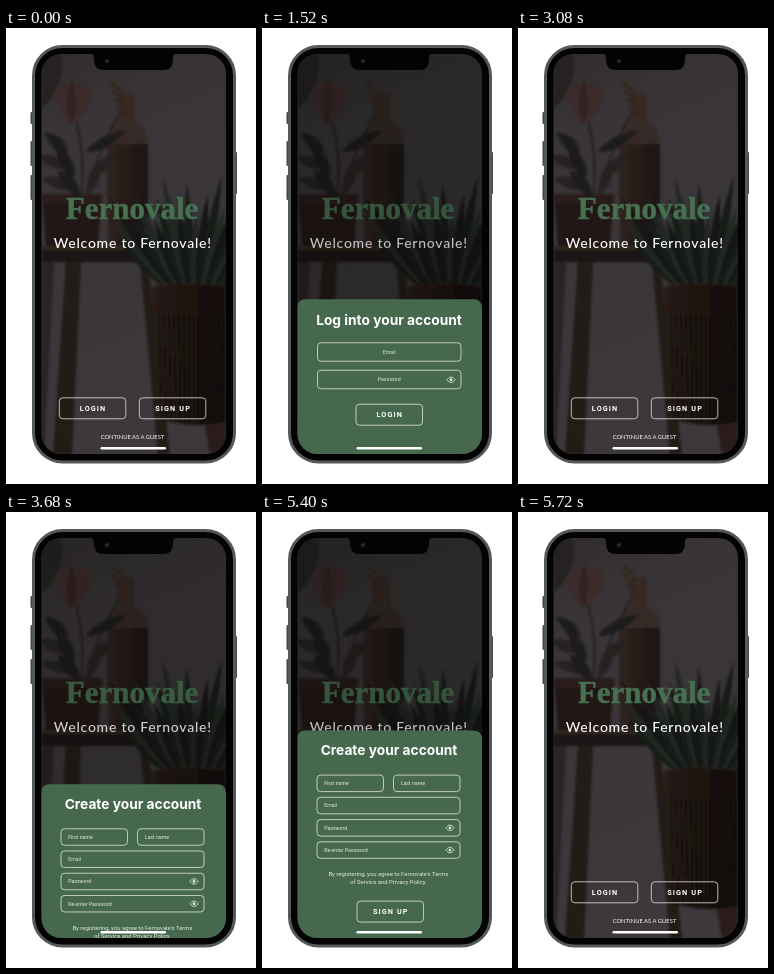
Animation, 250 px wide and 456 px high, one loop 5.76 s. Source, as an HTML page:

```html
<!DOCTYPE html>
<html lang="en">
<head>
<meta charset="utf-8">
<title>Plant shop sign-in</title>
<style>
html, body { margin: 0; width: 100%; height: 100%; overflow: hidden; background: #fff; }
svg { display: block; width: 100%; height: 100%; }
text { fill: #fff; }
.mid { text-anchor: middle; }
.brand { font: bold 31px "Liberation Serif", serif; fill: #46704f; stroke: #46704f; stroke-width: .5; }
.hello { font: 500 14px Lato, sans-serif; letter-spacing: .75px; }
.title { font: bold 13.75px Inter, sans-serif; }
.cap { font: bold 7.3px Roboto, sans-serif; letter-spacing: 1.1px; }
.guest { font: 5.85px Lato, sans-serif; }
.small { font: 5.2px Roboto, sans-serif; fill: #e4ebe5; }
.terms { font-size: 5.95px; }
.box { fill: none; stroke: #dfe4df; stroke-width: .8; }
.sheet { fill: #46694d; }
</style>
</head>
<body>
<svg viewBox="0 0 250 456">
  <defs>
    <clipPath id="screen"><rect x="35.500" y="26" width="184.500" height="400" rx="20"/></clipPath>
    <linearGradient id="wall" x1="0" y1="0" x2=".2" y2="1">
      <stop offset="0" stop-color="#302c2e"/>
      <stop offset=".2" stop-color="#383437"/>
      <stop offset="1" stop-color="#3c383b"/>
    </linearGradient>
    <linearGradient id="clay">
      <stop offset="0" stop-color="#30231f"/>
      <stop offset=".4" stop-color="#2a1d18"/>
      <stop offset="1" stop-color="#1a1312"/>
    </linearGradient>
    <linearGradient id="pot">
      <stop offset="0" stop-color="#281b17"/>
      <stop offset=".4" stop-color="#1e1411"/>
      <stop offset="1" stop-color="#120d0c"/>
    </linearGradient>
    <filter id="soft" x="-5%" y="-5%" width="110%" height="110%"><feGaussianBlur stdDeviation=".8"/></filter>
    <filter id="edge" x="-5%" y="-5%" width="110%" height="110%"><feGaussianBlur stdDeviation=".55"/></filter>
  </defs>

  <g filter="url(#edge)">
    <g fill="#444849">
      <rect x="24.500" y="84" width="4" height="12" rx="1"/>
      <rect x="24.500" y="113" width="4" height="25" rx="1"/>
      <rect x="24.500" y="147" width="4" height="25" rx="1"/>
      <rect x="227" y="124" width="4" height="42" rx="1"/>
    </g>
    <rect x="27.500" y="18.500" width="201" height="415.500" rx="29" fill="#030303" stroke="#56595a" stroke-width="3"/>
  </g>

  <g clip-path="url(#screen)">
    <rect x="35" y="26" width="185" height="401" fill="url(#wall)"/>
    <g filter="url(#soft)">
      <path d="M35 26H54Q60 44 50 62Q44 76 35 80Z" fill="#262122"/>
      <path d="M60 234H75L66 427H47Z M134 234H142L164 427H152Z" fill="#241b19"/>
      <path d="M35 234H48L38 427H35Z" fill="#292325"/>
      <path d="M35 218H148L152 222V234H35Z" fill="#1e1512"/>
      <path d="M35 218H148L152 222H35Z" fill="#32251f"/>
      <path d="M112 66Q120 62 129 66V95Q142 100 142 116H101Q101 100 112 95Z" fill="#352925"/>
      <path d="M101 116H142V192Q138 206 130 218H103Q101 200 101 116Z" fill="url(#clay)"/>
      <path d="M36 166H96L92 218H40Z" fill="#201613"/>
      <path d="M36 166H96V176H36Z" fill="#2a1e1a"/>
      <path d="M75 168Q80 130 70 92M80 166Q92 124 112 88M70 168Q60 136 48 118" fill="none" stroke="#201b1a" stroke-width="1.500"/>
      <path d="M66 96Q48 84 52 58Q60 62 66 52Q74 60 84 58Q88 82 66 96Z" fill="#3c2c29"/>
      <path d="M66 96Q56 80 66 52Q74 74 66 96Z" fill="#302321"/>
      <g id="berries" fill="#35271f"></g>
      <g id="leaves"></g>
      <g id="spikes"></g>
      <path d="M198 392H220V427H204Z" fill="#2a1f1c"/>
      <path d="M147 280H220V394Q190 400 166 394Q154 392 152 378Z" fill="url(#pot)"/>
      <g id="ribs" stroke="#0f0b0a" stroke-width="1.200"></g>
      <path d="M146 259Q181 252 220 259V284Q181 290 147 284Z" fill="url(#pot)"/>
      <path d="M146 259Q181 252 220 259" fill="none" stroke="#2d211c"/>
    </g>

    <text class="brand mid" x="126" y="190.500">Fernovale</text>
    <text class="hello mid" x="126.800" y="219.500">Welcome to Fernovale!</text>
    <g id="home"></g>
    <text class="guest mid" x="126.500" y="410.700">CONTINUE AS A GUEST</text>
    <rect id="scrim" x="35" y="26" width="185" height="401" opacity="0"/>

    <g id="login">
      <path class="sheet" d="M35 440V280Q35 271 44 271H211Q220 271 220 280V440Z"/>
      <text class="title mid" x="127" y="296.500">Log into your account</text>
    </g>
    <g id="signup">
      <path class="sheet" d="M35 440V224Q35 215 44 215H211Q220 215 220 224V440Z"/>
      <text class="title mid" x="127" y="239.500">Create your account</text>
      <text class="small terms mid" x="126.500" y="360.300">By registering, you agree to Fernovale's Terms</text>
      <text class="small terms mid" x="126.500" y="368.300">of Service and Privacy Policy.</text>
    </g>
    <rect x="94.500" y="419" width="65.500" height="2.400" rx="1.200" fill="#fff"/>
  </g>

  <path d="M84 25H171Q167 26 167 30V32Q167 42 157 42H98Q88 42 88 32V30Q88 26 84 25Z" fill="#030303"/>
  <circle cx="101" cy="33" r="2.600" fill="#15181f"/>
  <circle cx="101" cy="33" r="1.200" fill="#2b3140"/>
</svg>
<script>
const $ = id => document.getElementById(id);

function add(parent, tag, attrs, label) {
  const el = document.createElementNS('http://www.w3.org/2000/svg', tag);
  for (const k in attrs) el.setAttribute(k, attrs[k]);
  if (label) el.textContent = label;
  parent.append(el);
}

function box(parent, x, y, w, h) {
  add(parent, 'rect', { class: 'box', x, y, width: w, height: h, rx: 3.5 });
}

function button(parent, x, y, label) {
  box(parent, x, y, 66.5, 21);
  add(parent, 'text', { class: 'cap mid', x: x + 33.8, y: y + 13.1 }, label);
}

function field(parent, x, y, w, h, label, centred) {
  box(parent, x, y, w, h);
  add(parent, 'text', {
    class: centred ? 'small mid' : 'small',
    x: centred ? x + w / 2 : x + 7.2,
    y: y + h / 2 + 1.8
  }, label);
}

function eye(parent, x, y) {
  add(parent, 'path', {
    d: `M${x - 4.2} ${y}q4.2 -5.6 8.400 0q-4.200 5.600 -8.400 0Z`,
    fill: 'none', stroke: '#e3e8e3', 'stroke-width': .8
  });
  add(parent, 'circle', { cx: x, cy: y, r: 1.4, fill: '#e3e8e3' });
}

// Pointed leaf from a root, with its angle in degrees from upright.
function leaf(parent, x, y, angle, len, width, fill) {
  add(parent, 'path', {
    d: `M0 0Q${-width} ${-len * .45} 0 ${-len}Q${width} ${-len * .45} 0 0Z`,
    transform: `translate(${x} ${y}) rotate(${angle})`, fill
  });
}

[[62, 124, -50, 30, 11], [60, 140, -65, 30, 11], [68, 150, -28, 36, 12],
 [72, 160, -75, 38, 12], [80, 124, 62, 46, 10], [84, 148, 50, 34, 11],
 [74, 168, -40, 34, 12], [82, 166, 20, 36, 11]]
  .forEach((a, i) => leaf($('leaves'), ...a, i % 2 ? '#272121' : '#1e1a1a'));

for (let i = 0; i < 9; i++) {
  add($('berries'), 'circle', { cx: 107 + i + (i % 2) * 5, cy: 56 + i * 4, r: 2.6 });
}

for (let i = 0; i < 21; i++) {
  const side = i / 10 - 1;
  leaf($('spikes'), 188 + side * 24, 264, side * 46 + 2, 78 + (i * 37 % 5) * 10, 9,
    ['#181b19', '#232722', '#121513'][i % 3]);
}

for (let i = 0; i < 14; i++) {
  const x = 153 + i * 5;
  add($('ribs'), 'line', { x1: x, y1: 287, x2: 190 + (x - 190) * .92, y2: 394 });
}

button($('home'), 53.3, 369.8, 'LOGIN');
button($('home'), 133.3, 369.8, 'SIGN UP');

const login = $('login'), signup = $('signup');
field(login, 55.5, 314.5, 143.5, 18.5, 'Email', true);
field(login, 55.5, 342, 143.5, 18.5, 'Password', true);
eye(login, 189, 351.5);
button(login, 94, 376, 'LOGIN');

field(signup, 55, 259.5, 66.5, 16.5, 'First name');
field(signup, 131.5, 259.5, 66.5, 16.5, 'Last name');
field(signup, 55, 281.7, 143, 16.5, 'Email');
field(signup, 55, 304, 143, 16.5, 'Password');
field(signup, 55, 326.2, 143, 16.5, 'Re-enter Password');
eye(signup, 188, 312.2);
eye(signup, 188, 334.5);
button(signup, 95, 385.5, 'SIGN UP');

const LOOP = 5760, STEP = 40, SLIDE = 300;
const sheets = [
  { el: login, travel: 156, open: 1229, close: 2757 },
  { el: signup, travel: 212, open: 3517, close: 5397 }
];

// cubic-bezier(0, 0, .58, 1)
function easeOut(x) {
  if (x <= 0) return 0;
  if (x >= 1) return 1;
  let lo = 0, hi = 1;
  for (let i = 0; i < 24; i++) {
    const s = (lo + hi) / 2;
    if (1.74 * (1 - s) * s * s + s * s * s < x) lo = s; else hi = s;
  }
  return lo * lo * (3 - 2 * lo);
}

const start = performance.now();
function draw(now) {
  const t = Math.floor(Math.max(0, now - start) % LOOP / STEP) * STEP;
  let dim = 0;
  for (const { el, travel, open, close } of sheets) {
    const shown = easeOut((t - open) / SLIDE) - easeOut((t - close) / SLIDE);
    el.setAttribute('transform', `translate(0 ${travel * (1 - shown)})`);
    el.setAttribute('visibility', shown > 0 ? 'visible' : 'hidden');
    dim += shown;
  }
  $('scrim').setAttribute('opacity', .25 * dim);
  requestAnimationFrame(draw);
}
draw(start);
</script>
</body>
</html>
```
